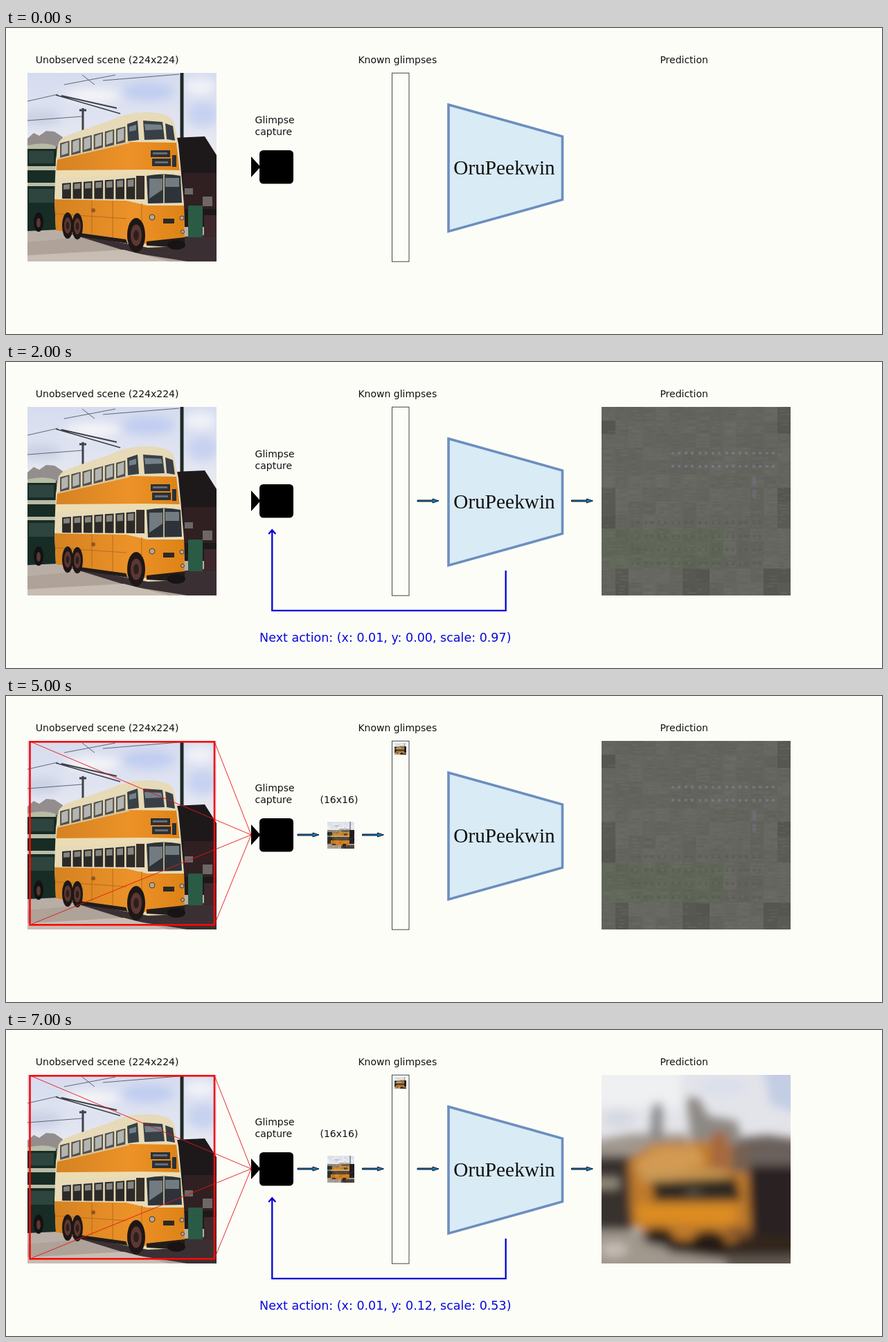
An HTML page for the animation above (8000 ms loop, 1265 px wide and 443 px high).

```html
<!DOCTYPE html>
<html lang="en">
<head>
<meta charset="utf-8">
<title>Glimpse loop</title>
<style>
  html, body { margin: 0; width: 100%; height: 100%; overflow: hidden; background: #fdfdf8; }
  svg { display: block; }
  text { font-family: "DejaVu Sans", sans-serif; font-size: 14px; fill: #111; white-space: pre; }
  .model { font-family: "Liberation Serif", serif; font-size: 29.3px; }
  .action { font-size: 17.5px; fill: #0808dc; }
</style>
</head>
<body>
<svg width="1265" height="443" viewBox="0 0 1265 443">
  <defs>
    <linearGradient id="sky" x2="0" y2="1">
      <stop offset="0" stop-color="#d6dcef"/>
      <stop offset=".45" stop-color="#dfe3f1"/>
      <stop offset="1" stop-color="#eeeef1"/>
    </linearGradient>
    <linearGradient id="side" x2="1" y2="0">
      <stop offset="0" stop-color="#d58222"/>
      <stop offset=".6" stop-color="#ec9228"/>
      <stop offset="1" stop-color="#dd8316"/>
    </linearGradient>
    <clipPath id="photoClip"><rect x="31" y="65" width="273" height="273"/></clipPath>
    <clipPath id="predClip"><rect x="860" y="65" width="273" height="273"/></clipPath>
    <filter id="soft" x="-20%" y="-20%" width="140%" height="140%"><feGaussianBlur stdDeviation="7"/></filter>
    <filter id="haze" x="-20%" y="-20%" width="140%" height="140%"><feGaussianBlur stdDeviation="7"/></filter>
    <path id="arrow" d="M0 -1H22V-3L31 0L22 3V1H0Z" fill="#1f77b4" stroke="#0a1c2c" stroke-linejoin="round"/>
  </defs>

  <rect width="1265" height="443" fill="#fdfdf8"/>

  <g clip-path="url(#photoClip)">
    <rect x="31" y="65" width="273" height="140" fill="url(#sky)"/>
    <g filter="url(#haze)">
      <ellipse cx="205" cy="92" rx="38" ry="13" fill="#c0cdf0"/>
      <ellipse cx="50" cy="130" rx="30" ry="12" fill="#cbd1e4"/>
      <ellipse cx="284" cy="125" rx="22" ry="18" fill="#c6d2f0"/>
      <ellipse cx="125" cy="98" rx="40" ry="10" fill="#f5f5f8"/>
      <ellipse cx="280" cy="85" rx="22" ry="12" fill="#f2f3f8"/>
    </g>
    <g fill="none" stroke="#555862">
      <path d="M84 82L158 68M110 68L128 82M31 106L75 96M140 76L250 67M31 134L110 128" stroke-width=".9"/>
      <path d="M72 97L165 124M80 98L160 116" stroke="#3d3f46" stroke-width="1.8"/>
      <path d="M111 116V152M106 119H116" stroke="#3f4147" stroke-width="3"/>
      <path d="M254 65V162" stroke="#1f2a27" stroke-width="5"/>
    </g>
    <path d="M31 160L40 152L48 156L58 149L70 150L82 158V190H31Z" fill="#7f7875" opacity=".8"/>
    <path d="M246 159L287 157L304 184V306H246Z" fill="#1d191b"/>
    <path d="M256 210H304V262H256Z" fill="#302022"/>
    <path d="M258 232H270V241H258ZM284 244H298V258H284Z" fill="#6d6766"/>
    <rect x="31" y="288" width="273" height="50" fill="#b9aea5"/>
    <path d="M31 310L120 302L180 321L304 314V338H31Z" fill="#aea299"/>
    <path d="M80 294L182 309L304 298V338H262L180 325Z" fill="#3a3033"/>
    <path d="M31 329L170 321L236 338H31Z" fill="#c8bdb2"/>
    <rect x="263" y="257" width="21" height="46" rx="2" fill="#2a5b45"/>
    <path d="M286 271H304V303H286Z" fill="#3d282b"/>

    <path d="M31 171Q55 165 73 172V292L31 294Z" fill="#172c24"/>
    <path d="M31 170Q55 164 72 171V175H31ZM31 200H72V206H31ZM31 224H72V229H31Z" fill="#b9bca5"/>
    <path d="M33 178H69V196H33ZM33 233H69V253H33Z" fill="#2e443e"/>
    <ellipse cx="47" cy="281" rx="7" ry="14" fill="#121214"/>
    <ellipse cx="47" cy="282" rx="3" ry="7" fill="#5e3834"/>

    <path d="M76 166Q80 158 92 154L150 134Q174 122 202 122Q235 122 242 135L249 168L253 210L257 256L258 306L248 316L205 318L72 293L70 245L72 190Z" fill="#e6dab8"/>
    <path d="M74 189L178 165L246 166L251 209L202 211L72 215Z" fill="url(#side)"/>
    <path d="M70 248L174 250L204 257L257 257L258 306L238 312L202 313L72 293Z" fill="url(#side)"/>
    <path d="M72 206L200 205L252 206V210L202 212L72 217Z" fill="#ecdcb2"/>
    <g id="upper" fill="#50504c"></g>
    <g id="lower" fill="#2c2a28"></g>
    <path d="M175 139L190 134L192 162L176 164ZM198 134L226 136L229 161L200 162ZM230 138L241 142L244 163L232 161Z" fill="#383f45"/>
    <path d="M200 139L224 140L226 147L201 148ZM178 143L188 140V148L178 150Z" fill="#74818a"/>
    <path d="M209 177H237V187H209ZM211 189H238V200H211ZM240 184H246V201H240Z" fill="#2c3037"/>
    <path d="M212 180H233V183H212ZM215 193H234V196H215Z" fill="#656d74"/>
    <path d="M203 214Q228 209 252 214L254 253L205 254Z" fill="#2d3338"/>
    <path d="M207 218H226V234L207 247ZM230 217H250V230H230Z" fill="#727b7f"/>
    <path d="M228 212V254M74 190L178 166" fill="none" stroke="#d8caa6" stroke-width="1.6"/>
    <path d="M188 214H200V248H188Z" fill="#362f2a"/>
    <path d="M71 269L174 276M124 250V298M154 250V304M196 254V280" fill="none" stroke="#b56c1d" stroke-width="1"/>
    <circle cx="126" cy="264" r="3" fill="#955420"/>
    <rect x="227" y="276" width="16" height="7" fill="#2c2926"/>
    <g fill="#b5a890" stroke="#4c3d2e">
      <circle cx="211" cy="274" r="4"/><circle cx="254" cy="275" r="3"/><circle cx="255" cy="295" r="2.5"/>
    </g>
    <path d="M108 297L173 306L176 312L108 302ZM203 309L258 303V311L236 317L203 315Z" fill="#221c1b"/>
    <g id="wheels"></g>
  </g>

  <text x="42.8" y="51">Unobserved scene (224x224)</text>
  <text x="508.4" y="51">Known glimpses</text>
  <text x="944.4" y="51">Prediction</text>
  <text x="359.6" y="138">Glimpse</text>
  <text x="359.6" y="154.5">capture</text>

  <rect x="366" y="177" width="49" height="48.5" rx="5.5"/>
  <path d="M354 186L367.5 201L354 216Z"/>
  <rect x="557.5" y="65.2" width="24.5" height="273" fill="none" stroke="#444"/>
  <path d="M639 111L803.5 157V248.5L639 294.5Z" fill="#d9ebf5" stroke="#6c8ebf" stroke-width="3.6"/>
  <text class="model" x="719.5" y="212" text-anchor="middle">OruPeekwin</text>

  <g data-on="4-8">
    <rect x="34.5" y="66.3" width="266.5" height="265" fill="none" stroke="#f80808" stroke-width="2.6"/>
    <path d="M35 66L354 201L35 331M301 66L354 201L301 331" fill="none" stroke="#e81414" stroke-width=".9"/>
    <text x="453.5" y="154.5">(16x16)</text>
    <use href="#arrow" x="421" y="201"/>
    <g id="mini" transform="translate(464 182) scale(2.44)" shape-rendering="crispEdges"></g>
  </g>
  <g data-on="5-8">
    <use href="#arrow" x="514.5" y="201"/>
    <use href="#mini" transform="translate(561 68) scale(.43) translate(-464 -182)"/>
  </g>
  <g data-on="1-3 6-8">
    <use href="#arrow" x="594" y="201"/>
    <use href="#arrow" x="816.5" y="201"/>
  </g>

  <g id="grey" data-on="1-6" clip-path="url(#predClip)" shape-rendering="crispEdges"></g>

  <g data-on="6-8" clip-path="url(#predClip)">
    <rect x="860" y="65" width="273" height="273" fill="#e3e4e9"/>
    <g filter="url(#soft)">
      <path d="M830 40H975V112H830Z" fill="#eff0f1"/>
      <path d="M1090 40H1160V125L1104 108Z" fill="#c3cde4"/>
      <ellipse cx="1035" cy="82" rx="36" ry="12" fill="#dbdfec"/>
      <ellipse cx="885" cy="128" rx="22" ry="14" fill="#d5d9e2"/>
      <path d="M840 162L905 150L985 150V195H840Z" fill="#a0978e"/>
      <path d="M934 106H948V158H930Z" fill="#878789"/>
      <path d="M982 98H1000L1014 124L1056 132L1066 180H992Z" fill="#8d8985"/>
      <path d="M1060 156L1100 152L1170 162V370H1060Z" fill="#6a605b"/>
      <path d="M1074 196H1170V316H1070Z" fill="#2a2422"/>
      <path d="M830 182H905V292H830Z" fill="#39332d"/>
      <path d="M840 215H885V229H840Z" fill="#9a9180"/>
      <path d="M830 290H925L990 318L1070 322V370H830Z" fill="#a0978d"/>
      <ellipse cx="878" cy="318" rx="20" ry="10" fill="#c6beb6"/>
      <path d="M930 298H1170V322L1060 334L960 322Z" fill="#30271f"/>
      <path d="M1040 326H1170V370H1040Z" fill="#5f5650"/>
      <path d="M899 188L935 164L1042 160L1070 190L1076 294L1040 310L940 300L904 282Z" fill="#bf7a29"/>
      <path d="M905 196L938 170L1000 168L1010 196L925 214Z" fill="#d39a52"/>
      <path d="M1018 148H1042V203H1020Z" fill="#a4683f"/>
      <path d="M1046 165H1074V206H1046Z" fill="#766151"/>
      <path d="M918 206L1030 202L1050 212L916 220Z" fill="#c79a56"/>
      <path d="M933 220L1054 214L1062 247L936 248Z" fill="#2f2c24"/>
      <path d="M982 230H1004V240H982Z" fill="#554f40"/>
      <path d="M908 253H1054V282L915 279Z" fill="#dc8c22"/>
      <ellipse cx="942" cy="299" rx="22" ry="13" fill="#2c2018"/>
      <ellipse cx="1015" cy="308" rx="26" ry="18" fill="#261c17"/>
      <path d="M1040 285H1074V300H1040Z" fill="#85532a"/>
    </g>
  </g>

  <g data-on="2-5 7-8">
    <path d="M721.7 302V359.8H384.3V244M379.3 249L384.3 243.2L389.3 249" fill="none" stroke="#0000d8" stroke-width="2.3"/>
    <text id="action" class="action" x="366.1" y="404.5"></text>
  </g>
</svg>

<script>
const $ = id => document.getElementById(id);
let seed = 11;
const rnd = () => (seed = seed * 16807 % 2147483647) / 2147483647;
const box = (x, y, w, h, fill, more = "") =>
  `<rect x="${x}" y="${y}" width="${w}" height="${h}" fill="${fill}" ${more}/>`;
const rgb = c => `rgb(${c.map(Math.round)})`;

// A slanted row of panes between two upright edges [x, top, bottom];
// the glare covers the given share of each pane.
function paneRow(a, b, count, glare, tint) {
  const at = k => a.map((v, i) => v + (b[i] - v) * k);
  let out = "";
  for (let i = 0; i < count; i++) {
    const [x0, t0, b0] = at((i + .07) / count), [x1, t1, b1] = at((i + .9) / count);
    const m0 = t0 + (b0 - t0) * glare, m1 = t1 + (b1 - t1) * glare;
    out += `<path d="M${x0} ${t0}L${x1} ${t1}V${b1}L${x0} ${b0}Z"/>` +
      `<path d="M${x0 + 2} ${t0 + 2}L${x1 - 2} ${t1 + 2}V${m1}L${x0 + 2} ${m0}Z" fill="${tint}"/>`;
  }
  return out;
}

function wheel(x, y, rx, ry) {
  const oval = (k, fill) => `<ellipse cx="${x}" cy="${y}" rx="${rx * k}" ry="${ry * k}" fill="${fill}"/>`;
  return oval(1, "#1e1716") + oval(.62, "#5d3731") + oval(.3, "#2c1f1e");
}

// Low resolution view of the scene: layers of [x, y, w, h, colour].
function miniView() {
  const layers = [
    [0, 0, 16, 16, [226, 229, 236]], [0, 5, 3, 2, [140, 136, 132]],
    [13, 0, 1, 6, [142, 150, 158]], [4, 2, 3, 1, [190, 194, 202]],
    [13, 5, 3, 9, [36, 30, 30]], [0, 6, 3, 8, [42, 50, 43]], [0, 8, 2, 1, [120, 123, 106]],
    [0, 13, 16, 3, [168, 158, 150]], [8, 14, 8, 2, [76, 67, 66]],
    [7, 4, 6, 1, [196, 182, 152]], [3, 5, 10, 1, [150, 136, 112]], [8, 5, 5, 1, [100, 98, 92]],
    [3, 6, 10, 3, [205, 134, 50]], [3, 6, 4, 1, [146, 124, 94]], [10, 7, 2, 1, [98, 80, 58]],
    [2, 8, 11, 1, [214, 170, 96]], [3, 9, 10, 2, [84, 72, 58]],
    [2, 11, 11, 3, [205, 126, 32]], [3, 13, 2, 1, [70, 48, 34]], [9, 13, 2, 2, [54, 38, 32]]
  ];
  let out = "";
  for (let y = 0; y < 16; y++) for (let x = 0; x < 16; x++) {
    const c = layers.findLast(([a, b, w, h]) => x >= a && x < a + w && y >= b && y < b + h)[4];
    const n = (rnd() - .5) * 20;
    out += box(x, y, 1.02, 1.02, rgb(c.map(v => v + n)));
  }
  return out;
}

// Flat first guess: 14 x 14 patches, each with faint inner stripes.
function greyView() {
  const s = 19.5;
  let out = "";
  for (let r = 0; r < 14; r++) for (let c = 0; c < 14; c++) {
    const x = 860 + c * s, y = 65 + r * s;
    const green = r > 8 && r < 12 && c < 9;
    const dark = (c === 13 && (r < 2 || r > 5 && r < 9)) || (c === 0 && (r === 1 || r > 5 && r < 9)) ||
      (r > 11 && (c === 1 || c === 6 || c === 7 || c > 11));
    const v = 101 + (rnd() - .5) * 7 - (dark ? 13 : 0);
    out += box(x, y, s + .5, s + .5, rgb([v - (green ? 5 : 0), v + (green ? 2 : 0), v - (green ? 12 : 6)]));
    for (let k = 0; k < 4; k++)
      out += box(x + rnd() * 9, y + k * 4.9, 5 + rnd() * 9, 2.4, rnd() < .5 ? "#505850" : "#76776f", 'opacity=".22"');
    if (c > 4 && c < 13 && (r === 3 || r === 4))
      for (const dx of [3, 12]) out += box(x + dx, y + 6, 4, 4, "#858ba6", 'opacity=".42"');
    if (c === 11 && r > 4 && r < 7) out += box(x + 3, y + 3, 5, 12, "#777894", 'opacity=".35"');
    if (r > 7 && r < 12 && c > 1 && c < 12)
      for (const dx of [3, 12]) out += box(x + dx, y + 9, 4, 5, "#4b5b4d", 'opacity=".4"');
  }
  return out;
}

$("upper").innerHTML = paneRow([77, 167, 188], [174, 142, 165], 6, .85, "#b4b5b1");
$("lower").innerHTML = paneRow([80, 225, 247], [188, 217, 248], 7, .4, "#85857f");
$("wheels").innerHTML = wheel(89, 286, 8, 19) + wheel(103, 287, 8, 19) + wheel(188, 300, 13, 25) +
  '<ellipse cx="246" cy="314" rx="13" ry="7" fill="#181415"/>';
$("mini").innerHTML = miniView();
$("grey").innerHTML = greyView();

const parts = [...document.querySelectorAll("[data-on]")].map(el => ({
  el, spans: el.dataset.on.split(" ").map(s => s.split("-").map(Number))
}));
const start = performance.now();

function draw(now) {
  const t = Math.max(0, now - start) / 1000 % 8;
  for (const { el, spans } of parts)
    el.style.display = spans.some(([a, b]) => t >= a && t < b) ? "" : "none";
  const [y, scale] = t < 6 ? ["0.00", "0.97"] : ["0.12", "0.53"];
  $("action").textContent = `Next action: (x: 0.01, y: ${y}, scale: ${scale})`;
  requestAnimationFrame(draw);
}
draw(start);
</script>
</body>
</html>
```
